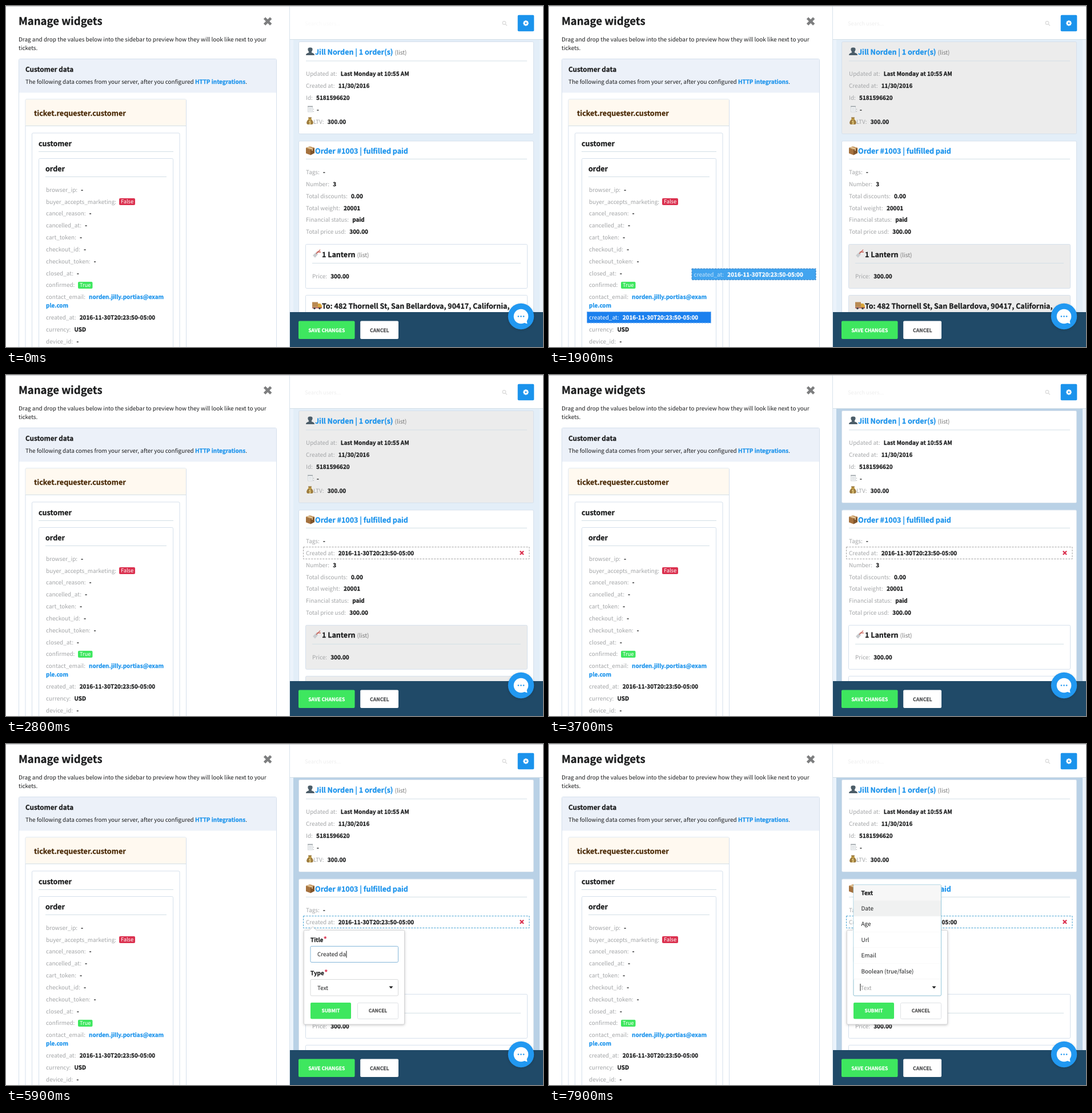
Animation, 940 px wide and 596 px high, one loop 8 s. Source, as an HTML page:

```html
<!DOCTYPE html>
<html lang="en">
<head>
<meta charset="utf-8">
<title>Manage widgets</title>
<style>
html, body { margin: 0; width: 100%; height: 100%; overflow: hidden; background: #fff; }
svg { display: block; width: 940px; height: 596px; }
text { font-family: "Noto Sans CJK JP", "Noto Sans CJK SC", "Noto Sans CJK", "Open Sans", sans-serif;
  white-space: pre; text-rendering: geometricPrecision; }
</style>
</head>
<body>
<svg id="stage" viewBox="0 0 940 596"></svg>
<script>
const LOOP = 8000, BASE = 9.95, PITCH = 20.85;
const INK = '#1b1c1d', GREY = '#a3a5a7', BLUE = '#1b93ec', GREEN = '#3ee75f', RED = '#db3250';
const LINE = '#d5e0ec', RULE = '#d3dfe6', DROP = '#1b80ee';
const stage = document.getElementById('stage');

function el(tag, parent, attrs, text) {
  const e = document.createElementNS('http://www.w3.org/2000/svg', tag);
  set(e, attrs || {});
  if (text) e.textContent = text;
  parent.appendChild(e);
  return e;
}
function set(e, attrs) { for (const k in attrs) e.setAttribute(k, attrs[k]); }
const group = p => el('g', p);
const box = (p, x, y, w, h, fill, stroke = 'none', rx = 0) =>
  el('rect', p, { x, y, width: w, height: h, fill, stroke, rx });
const path = (p, d, fill, stroke = 'none', width = 1) =>
  el('path', p, { d, fill, stroke, 'stroke-width': width });
const rule = (p, x1, x2, y) => path(p, `M${x1} ${y}H${x2}`, 'none', RULE);
const disc = (p, cx, cy, r, fill) => el('circle', p, { cx, cy, r, fill });
// A hairline stroke gives bold text its full weight.
const strong = fill => ({ fill, 'font-weight': 700, stroke: fill, 'stroke-width': 0.25 });
const plain = fill => ({ fill, 'font-weight': 400, stroke: 'none' });
// Text placed by its vertical centre.
const label = (p, x, y, text, size = BASE, fill = INK, bold = false, anchor = 'start') =>
  el('text', p, { x, y: y + size * 0.37, 'font-size': size, 'text-anchor': anchor,
    ...(bold ? strong(fill) : plain(fill)) }, text);
const dashed = (p, x, y, w, h, fill, stroke) => {
  const r = box(p, x, y, w, h, fill, stroke);
  set(r, { 'stroke-dasharray': '3 2' });
  return r;
};
function pair(p, x, y, name, value, nameFill = GREY, valueFill = INK) {
  const t = label(p, x, y, '');
  el('tspan', t, { fill: nameFill }, name + ':');
  el('tspan', t, { ...strong(valueFill), dx: 6.2 }, value);
  return t;
}
const listTag = t => el('tspan', t, { ...plain('#767676'), 'font-size': 10.2, dx: 3 }, '(list)');
const shift = (e, x, y) => set(e, { transform: `translate(${x} ${y})` });
const show = (e, a) => set(e, { opacity: +a, visibility: a > 0 ? 'visible' : 'hidden' });
const ramp = (t, a, b) => Math.min(1, Math.max(0, (t - a) / (b - a)));
const ease = x => x * x * (3 - 2 * x);
const mix = (a, b, k) => a.map((v, i) => Math.round(v + (b[i] - v) * k));
const rgb = c => `rgb(${c})`;

// Left panel
const left = group(stage);
label(left, 22, 26.5, 'Manage widgets', 18.5, INK, true);
path(left, 'M452.5 21.2L463.7 32.4M463.7 21.2L452.5 32.4', 'none', '#7d7e7f', 4.6);
label(left, 22, 58.3, 'Drag and drop the values below into the sidebar to preview how they will look like next to your');
label(left, 22, 73.3, 'tickets.');
box(left, 22.5, 92.5, 451, 520, '#fff', LINE, 2);
box(left, 23, 93, 450, 58.5, '#ecf1f9');
label(left, 34, 111, 'Customer data', 11.7, INK, true);
const note = label(left, 34, 132, 'The following data comes from your server, after you configured ');
el('tspan', note, strong(BLUE), 'HTTP integrations');
el('tspan', note, {}, '.');
box(left, 34, 163, 281.5, 450, '#fff', LINE, 2);
box(left, 34.5, 163.5, 280.5, 46, '#fff9f0');
rule(left, 34, 315.5, 209.5);
label(left, 49, 187, 'ticket.requester.customer', 12.6, '#4a2a06', true);
box(left, 45.5, 222, 258.5, 400, '#fff', LINE, 2);
label(left, 57, 240, 'customer', 12.5, INK, true);
rule(left, 57, 293, 254.5);
box(left, 57.5, 266.5, 235, 400, '#fff', LINE, 2);
label(left, 69, 284, 'order', 12.5, INK, true);
rule(left, 69, 281, 298.5);

const fields = 'browser_ip buyer_accepts_marketing cancel_reason cancelled_at cart_token checkout_id checkout_token closed_at confirmed'.split(' ');
const badges = { buyer_accepts_marketing: ['False', RED, 198, 28], confirmed: ['True', GREEN, 126, 25.5] };
fields.forEach((name, i) => {
  const y = 321 + i * PITCH, badge = badges[name];
  pair(left, 70, y, name, badge ? '' : '-');
  if (!badge) return;
  const [word, fill, x, w] = badge;
  box(left, x, Math.round(y - 6), w, 12, fill, 'none', 2);
  label(left, x + w / 2, y - 0.2, word, 9.3, '#fff', false, 'middle');
});
const mailHover = dashed(left, 66.5, 498.5, 217, 35, 'none', '#cfcfcf');
pair(left, 70, 508.5, 'contact_email', 'norden.jilly.portias@exam', GREY, BLUE);
label(left, 70, 523.5, 'ple.com', BASE, BLUE, true);

const STAMP = '2016-11-30T20:23:50-05:00';
const made = group(left);
const madeBack = dashed(made, 66.5, 534.5, 217, 19.5, 'none', '#b5b5b5');
const madeText = pair(made, 70, 544.6, 'created_at', STAMP);
const rest = group(left);
const restHover = dashed(rest, 66.5, 555, 217, 20, 'none', '#a8a8a8');
[['currency', 'USD'], ['device_id', '-'], ['discount_codes', '-']].forEach(([n, v], i) =>
  pair(rest, 70, 565.4 + i * PITCH, n, v));

// Right panel
const right = group(stage);
box(right, 497, 59, 443, 480, '#ebf3fb');
const zone = box(right, 503, 59, 431, 480, '#e3eef8');
path(right, 'M496.5 0V596', 'none', '#d8e2ec');

const cards = [];
function card(p, x, y, w, h) {
  const c = box(p, x, y, w, h, '#fff', LINE, 2);
  cards.push(c);
  return c;
}
card(right, 512.5, 62.5, 411, 161);
path(right, 'M525 86C525 82 530 82.5 530.3 80.5C527 76 528 72.5 532.5 72.5S538 76 534.7 80.5C535 82.5 540 82 540 86Z', '#4c5d68');
listTag(label(right, 541, 80, 'Jill Norden | 1 order(s)', 12.5, BLUE, true));
rule(right, 525, 912, 96);
pair(right, 525, 118.7, 'Updated at', 'Last Monday at 10:55 AM');
pair(right, 525, 139.5, 'Created at', '11/30/2016');
pair(right, 525, 160.2, 'Id', '5181596620');
box(right, 528.5, 176, 8, 9, '#f1f3f4', '#d5d9dc');
path(right, 'M528 175.5H537', 'none', '#9aa1a6', 1.5);
path(right, 'M530 179.5H535M530 182H535', 'none', '#c6cbd0', 0.7);
label(right, 537, 181.3, ':', BASE, GREY);
label(right, 544, 181.3, '-', BASE, INK, true);
path(right, 'M529.5 196L528.8 194.5H535.2L534.5 196V198C539 201.5 538.5 207 535.5 207H528.5C525.5 207 525 201.5 529.5 198Z', '#9c7b3e');
path(right, 'M529 198H535', 'none', '#d9b44a', 1.4);
label(right, 532, 203, '$', 7, '#f6df8e', true, 'middle');
pair(right, 538, 202, 'LTV', '300.00');

box(right, 512.5, 236, 411, 420, '#fff', LINE, 2);
path(right, 'M525 248L532 245.5L540 248V257L533 260.5L525 257.5Z', '#a5723f');
path(right, 'M525 248L532 245.5L540 248L533 251Z', '#c99c66');
path(right, 'M533 251L540 248V257L533 260.5Z', '#80552c');
path(right, 'M528 247L536 249.8V253', 'none', '#ead2a8', 1.5);
label(right, 541, 253.5, 'Order #1003 | fulfilled paid', 12.5, BLUE, true);
rule(right, 525, 912, 267.5);
pair(right, 525, 290.5, 'Tags', '-');

const bar = group(right);
box(bar, 520, 300.7, 396.5, 21, DROP);
pair(bar, 525, 311, 'created_at', STAMP, '#fff', '#fff');
const number = group(right);
pair(number, 525, 311.2, 'Number', '3');
const lower = group(right);
[['Total discounts', '0.00'], ['Total weight', '20001'], ['Financial status', 'paid'], ['Total price usd', '300.00']]
  .forEach(([n, v], i) => pair(lower, 525, 332 + i * PITCH, n, v));
card(lower, 524.5, 416.5, 388, 77);
path(lower, 'M537 436L543 430L546 434L541 440Z', '#c9cdd0');
path(lower, 'M543 433L550 426M544 430L551 430', 'none', '#c65a50', 1.3);
listTag(label(lower, 553, 434, '1 Lantern', 12.5, INK, true));
rule(lower, 536, 901, 449.5);
pair(lower, 536, 472.5, 'Price', '300.00');
card(lower, 524.5, 505.5, 388, 100);
box(lower, 536, 517.5, 10, 9, '#b98a52');
path(lower, 'M546 520H550.5L553 524V527H546Z', '#d8a53c');
path(lower, 'M536 527.5H553', 'none', '#a8443c', 1.5);
disc(lower, 540, 528.5, 1.8, '#444');
disc(lower, 549, 528.5, 1.8, '#444');
label(lower, 553, 524.2, 'To: 482 Thornell St, San Bellardova, 90417, California,', 12.5, INK, true);

const saved = group(right);
const savedBox = dashed(saved, 520.5, 300.7, 395.5, 20.8, 'none', '#a0a0a0');
pair(saved, 525, 311, 'Created at', STAMP);
path(saved, 'M899.8 307.8L906 314M906 307.8L899.8 314', 'none', RED, 2.3);

// Popup form
const popup = group(stage);
set(popup, { style: 'filter:drop-shadow(0 1px 2px rgba(34,36,38,.25))' });
path(popup, 'M523.5 325.5H531L537 319.5L543 325.5H695.5Q697.5 325.5 697.5 327.5V488Q697.5 490 695.5 490H523.5Q521.5 490 521.5 488V327.5Q521.5 325.5 523.5 325.5Z', '#fff', '#d4d4d5');
for (const [word, y, x] of [['Title', 342, 556], ['Type', 400, 557.5]]) {
  label(popup, 533, y, word, BASE, INK, true);
  label(popup, x, y - 1, '*', 11, RED, true);
}
const input = box(popup, 533, 353.5, 153.5, 28, '#fff', '#85b7d9', 2);
const entry = label(popup, 545, 367.5, 'Created at');
const caret = box(popup, 0, 361.5, 1, 12, INK);
box(popup, 533, 411.5, 153.5, 28.5, '#fff', '#d9dadb', 2);
label(popup, 545, 426, 'Text');
path(popup, 'M670.5 423.5H677.5L674 427.5Z', INK);
box(popup, 533, 452, 71, 28.5, GREEN, 'none', 2);
label(popup, 568.5, 466, 'SUBMIT', 8.3, '#fff', true, 'middle');
box(popup, 615.5, 452.5, 71, 28, '#fff', '#dfe2e5', 2);
label(popup, 651, 466, 'CANCEL', 8.3, '#555', true, 'middle');

const menu = group(stage);
box(menu, 533, 246, 153.5, 194, '#fff', '#96c8da', 2);
const picks = ['Text', 'Date', 'Age', 'Url', 'Email', 'Boolean (true/false)'].map((word, i) => {
  const y = 260 + i * 27.4;
  const back = box(menu, 533.5, y - 13.5, 152.5, 27.4, '#fff');
  path(menu, `M533.5 ${y + 13.9}H686`, 'none', '#f6f6f6');
  label(menu, 546.5, y, word, BASE, INK, i === 0);
  return back;
});
const menuCaret = box(menu, 544.5, 419, 1, 12.5, INK);
label(menu, 545.5, 426, 'Text', BASE, '#a0a0a0');
path(menu, 'M670.5 423.5H677.5L674 427.5Z', INK);

// Header and footer bars
const chrome = group(stage);
box(chrome, 497, 0, 443, 59, '#fff');
rule(chrome, 497, 940, 58.5);
const search = group(chrome);
label(search, 523, 30.5, 'Search users...', 9.4, '#eeeeee');
el('circle', chrome, { cx: 872, cy: 29.5, r: 2.8, fill: 'none', stroke: '#dedede', 'stroke-width': 1.4 });
path(chrome, 'M874 31.5L877 34.5', 'none', '#dedede', 1.6);
box(chrome, 895.7, 15.8, 28.6, 28.4, BLUE, 'none', 2);
for (let i = 0; i < 4; i++)
  set(box(chrome, 908.8, 25.2, 2.4, 9.6, '#fff'), { transform: `rotate(${i * 45} 910 30)` });
disc(chrome, 910, 30, 3.7, '#fff');
disc(chrome, 910, 30, 1.5, BLUE);
box(chrome, 497, 535, 443, 61, '#204a68');
box(chrome, 512, 550.5, 98.5, 31.5, GREEN, 'none', 2);
label(chrome, 561.3, 566.5, 'SAVE CHANGES', 8.6, '#fff', true, 'middle');
box(chrome, 620.2, 550.5, 66.8, 31.5, '#fff', 'none', 2);
label(chrome, 653.8, 566.5, 'CANCEL', 8.6, '#505153', true, 'middle');
const chat = group(chrome);
set(chat, { style: 'filter:drop-shadow(0 1px 2px rgba(0,0,0,.15))' });
disc(chat, 901.5, 542.5, 22.7, '#2198f1');
disc(chrome, 901.5, 542.5, 12.8, '#fff');
path(chrome, 'M905 553L912.5 555.5L911 547Z', '#fff');
for (const dx of [-4.6, 0, 4.6]) disc(chrome, 901.5 + dx, 542.5, 1.3, '#2198f1');
path(chrome, 'M0 0.5H940', 'none', '#c4c6c8');

const ghost = group(stage);
dashed(ghost, 0.5, 0.5, 217, 19.5, '#329dee', '#1f6fb8');
pair(ghost, 4, 10.4, 'created_at', STAMP, '#bfe0fa', '#fff');

const typed = [[0, 'Created at'], [5300, 'Created a'], [5500, 'Created '], [5700, 'Created d'],
  [5900, 'Created da'], [6000, 'Created dat'], [6200, 'Created date']];
const GRAB = 1590, ENTER = 2200, SWAP = 2320, RELEASE = 2800, OPEN = 4700, PICK = 6900;

function draw(t) {
  show(search, 0.35 + 0.65 * ramp(t, 100, 500));
  const dragging = t >= GRAB && t < RELEASE;
  const inside = t >= ENTER && t < RELEASE;

  show(mailHover, ramp(t, 950, 1050) * (1 - ramp(t, 1200, 1450)));
  show(made, !inside);
  show(madeBack, t < RELEASE ? ramp(t, 1150, 1300) : 0);
  set(madeBack, { fill: dragging ? DROP : 'none', stroke: dragging ? '#7db6f5' : '#b5b5b5' });
  const [name, value] = madeText.children;
  set(name, { fill: dragging ? '#fff' : GREY });
  set(value, strong(dragging ? '#fff' : INK));
  shift(rest, 0, inside ? -PITCH * ease(ramp(t, ENTER, ENTER + 150)) : 0);
  show(restHover, inside);

  // The ghost follows the pointer from the list to the order card.
  show(ghost, dragging ? 0.92 : 0);
  const a = ramp(t, GRAB, 1900), b = ramp(t, 1900, 2400), c = ease(ramp(t, 2400, 2650));
  shift(ghost, 66 + 183 * a + 293 * b + 4 * c, 534 - 75 * a - 174 * b + 8 * c);

  const grey = ramp(t, GRAB, GRAB + 150) * (1 - ramp(t, RELEASE, RELEASE + 150));
  cards.forEach(e => set(e, { fill: rgb(mix([255, 255, 255], [236, 236, 236], grey)) }));
  set(zone, { fill: rgb(mix([227, 238, 248], [185, 209, 230], ramp(t, RELEASE, RELEASE + 300))) });

  const swap = ease(ramp(t, SWAP, SWAP + 145));
  show(bar, inside);
  shift(bar, 0, PITCH * (1 - swap));
  shift(number, 0, PITCH * swap);
  shift(lower, 0, PITCH * ease(ramp(t, ENTER, ENTER + 150)));
  show(saved, t >= RELEASE);
  set(savedBox, { stroke: t >= OPEN ? '#3e9fd0' : '#a0a0a0' });

  show(popup, ramp(t, OPEN, OPEN + 200));
  const last = typed.filter(k => k[0] <= t).pop();
  entry.textContent = last[1];
  const focus = t >= OPEN + 200 && t < PICK;
  const since = t - Math.max(last[0], OPEN);
  set(caret, { x: 545.3 + entry.getComputedTextLength() });
  show(caret, focus && since % 1000 < 500);
  set(input, { stroke: t < PICK ? '#85b7d9' : '#d9dadb' });

  show(menu, ramp(t, PICK, PICK + 200));
  show(menuCaret, t >= PICK && (t - PICK) % 1000 < 500);
  const over = t < 7300 ? 0 : t < 7450 ? 3 : t < 7600 ? 2 : 1;
  picks.forEach((e, i) => set(e, { fill: i === over && i ? '#f0f1f1' : i ? '#fff' : '#f7f7f7' }));
}

const start = performance.now();
function frame(now) {
  draw(Math.max(0, now - start) % LOOP);
  requestAnimationFrame(frame);
}
draw(0);
requestAnimationFrame(frame);
</script>
</body>
</html>
```
